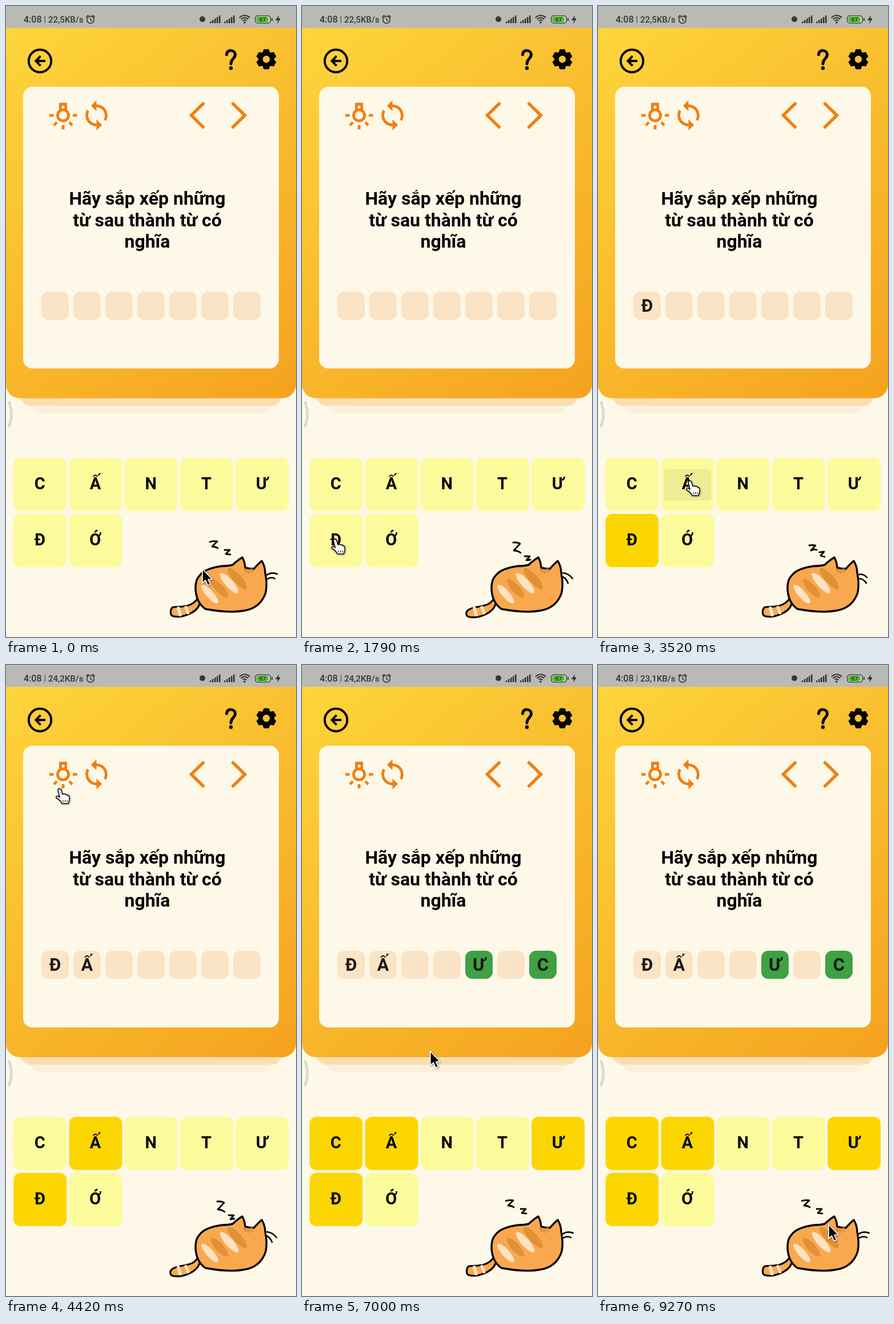
Write an HTML page with a canvas that moves like this. It is 508 px wide and 1102 px high and loops after 9.3 s.

```html
<!DOCTYPE html>
<html lang="vi">
<head>
<meta charset="utf-8">
<style>
html, body { margin: 0; width: 100%; height: 100%; overflow: hidden; background: #fdf8e8; }
canvas { display: block; width: 508px; height: 1102px; }
</style>
</head>
<body>
<canvas id="stage" width="508" height="1102"></canvas>
<script>
const ctx = document.getElementById('stage').getContext('2d');
const LOOP = 9300;
const CREAM = '#fdf8e8', ORANGE = '#f17f12', INK = '#353535';

// Times at which the game state switches
const pick = { 'Đ': 2020, 'Ấ': 3640, 'Ư': 4960, 'C': 5560 };
const rates = [[0, '22,5KB/s'], [4050, '24,2KB/s'], [8200, '23,1KB/s']];
const presses = [[1880, 2130, 0, 1], [3440, 3640, 1, 0], [7350, 7960, 2, 0]];
const tiles = ['CẤNTƯ', 'ĐỚ'];
const slots = ['Đ', 'Ấ', '', '', 'Ư', '', 'C'];

// Pointer: time, x, y
const route = [
  [0, 343, 982], [550, 343, 982], [1450, 57, 931], [2250, 57, 931], [3000, 160, 829],
  [3700, 160, 829], [4330, 93, 220], [4420, 93, 216], [4750, 96, 199], [6500, 96, 199],
  [7250, 268, 838], [7500, 268, 838], [7820, 294, 871], [8500, 360, 945], [9270, 403, 976]
];

function rect(x, y, w, h, r, fill) {
  ctx.fillStyle = fill;
  ctx.beginPath();
  ctx.roundRect(x, y, w, h, r);
  ctx.fill();
}

function line(points, color, width, cap = 'butt', join = 'miter') {
  ctx.strokeStyle = color;
  ctx.lineWidth = width;
  ctx.lineCap = cap;
  ctx.lineJoin = join;
  ctx.beginPath();
  for (let i = 0; i < points.length; i += 2) ctx.lineTo(points[i], points[i + 1]);
  ctx.stroke();
}

function arc(x, y, r, color, width, from = 0, to = Math.PI * 2) {
  ctx.strokeStyle = color;
  ctx.lineWidth = width;
  ctx.beginPath();
  ctx.arc(x, y, r, from, to);
  ctx.stroke();
}

function dot(x, y, r, color) {
  ctx.fillStyle = color;
  ctx.beginPath();
  ctx.arc(x, y, r, 0, Math.PI * 2);
  ctx.fill();
}

function shape(d, fill, stroke, width) {
  const path = new Path2D(d);
  ctx.lineJoin = ctx.lineCap = 'round';
  if (fill) { ctx.fillStyle = fill; ctx.fill(path); }
  if (stroke) { ctx.strokeStyle = stroke; ctx.lineWidth = width; ctx.stroke(path); }
}

function text(str, x, y, size, color = '#050505', weight = 700, align = 'center') {
  ctx.font = `${weight} ${size}px Roboto, sans-serif`;
  ctx.fillStyle = color;
  ctx.textAlign = align;
  ctx.fillText(str, x, y);
}

function drawStatus(t) {
  rect(0, 0, 508, 38, 0, '#b9b9b6');
  const rate = rates.filter(r => r[0] <= t).pop()[1];
  text('4:08', 31, 29, 16, INK, 500, 'left');
  text('|', 66.5, 28, 14, INK, 400, 'left');
  text(rate, 74, 29, 15, INK, 500, 'left');

  arc(148, 24, 6.2, INK, 1.6);
  line([148, 20.5, 148, 24.5, 151, 26], INK, 1.4);
  line([140.5, 19.5, 144.5, 16], INK, 1.7);
  line([151.5, 16, 155.5, 19.5], INK, 1.7);

  dot(344, 23, 5, INK);
  for (const x of [357, 382])
    for (let i = 0; i < 5; i++) rect(x + i * 4, 27 - i * 2.6, 2.6, 3 + i * 2.6, 0.5, INK);

  for (const r of [12.5, 8.5, 4.5]) arc(418, 29, r, INK, 2.2, -Math.PI * 0.76, -Math.PI * 0.24);
  dot(418, 29, 1.8, INK);

  rect(436, 16.5, 28, 14, 5, INK);
  rect(437.3, 17.8, 25.4, 11.4, 4, '#c9cbc5');
  rect(438.5, 19, 21, 9, 3, '#43c51b');
  rect(465, 21, 2, 5, 1, INK);
  text('87', 449.5, 27.5, 10.5, INK, 500);
  shape('M478 16 L472 25 L476 25 L475 31 L481 21.5 L477 21.5 Z', INK);
}

function drawPanel() {
  rect(44, 660, 420, 51, 16, '#fcf0dc');
  rect(26, 650, 456, 48, 16, '#fbddb0');
  const glow = ctx.createLinearGradient(0, 38, 508, 685);
  glow.addColorStop(0, '#fdd53b');
  glow.addColorStop(1, '#f5a21f');
  rect(0, 38, 508, 647, [0, 0, 24, 24], glow);
  rect(30, 141, 448, 492, 16, CREAM);
}

function drawGear(x, y) {
  ctx.save();
  ctx.translate(x, y);
  ctx.fillStyle = '#050505';
  ctx.beginPath();
  ctx.arc(0, 0, 13.3, 0, Math.PI * 2);
  ctx.arc(0, 0, 6.2, 0, Math.PI * 2, true);
  ctx.fill();
  for (let i = 0; i < 6; i++) {
    shape('M-6.5 -10 L-4 -17 L4 -17 L6.5 -10 Z', '#050505', '#050505', 1.2);
    ctx.rotate(Math.PI / 3);
  }
  ctx.restore();
}

function drawIcons() {
  arc(59.5, 96, 19.7, '#050505', 4);
  line([69, 96, 53, 96], '#050505', 4);
  line([60.5, 87.5, 52.5, 96, 60.5, 104.5], '#050505', 4);
  shape('M386.5 85 C386.5 75 401.5 76 401.5 85 C401.5 92 394 92 394 101', null, '#050505', 5);
  dot(394, 108.5, 3.2, '#050505');
  drawGear(456, 93);

  arc(100, 191, 9.6, ORANGE, 4.8);
  line([95.4, 184, 95.4, 171.5, 104.6, 171.5, 104.6, 184], ORANGE, 4.8);
  const rays = [[76, 191, 83.5, 191], [117, 191, 124.5, 191], [100, 208, 100, 215.5],
    [89, 203, 84, 208.5], [111, 203, 116, 208.5]];
  for (const ray of rays) line(ray, ORANGE, 4.8);

  ctx.save();
  ctx.translate(158.5, 191);
  ctx.scale(2.42, 2.38);
  const half = 'M0 -8V-11L-4 -7L0 -3V-6C3.31 -6 6 -3.31 6 0C6 1.01 5.75 1.97 5.3 2.8' +
    'L6.76 4.26C7.54 3.03 8 1.57 8 0C8 -4.42 4.42 -8 0 -8Z';
  shape(half, ORANGE);
  ctx.rotate(Math.PI);
  shape(half, ORANGE);
  ctx.restore();

  line([347, 169, 324.5, 191, 347, 213], ORANGE, 5.4);
  line([396, 169, 418.5, 191, 396, 213], ORANGE, 5.4);
}

function drawBoard(t) {
  ['Hãy sắp xếp những', 'từ sau thành từ có', 'nghĩa']
    .forEach((row, i) => text(row, 247.5, 347 + i * 37.6, 32));

  slots.forEach((letter, i) => {
    const shown = letter && t >= pick[letter];
    const x = 62 + i * 56;
    rect(x, 499, 48, 49, 12, shown && i > 1 ? '#40a044' : '#fbe3c5');
    if (shown) text(letter, x + 24, 534, 31, i > 1 ? '#101a10' : '#1d1b18');
  });

  tiles.forEach((row, j) => [...row].forEach((letter, i) => {
    const x = 13.3 + i * 97.2, y = 789 + j * 98;
    rect(x, y, 93, 93, 12, t >= pick[letter] ? '#fcd603' : '#fcfb9b');
    for (const [from, to, col, line] of presses)
      if (col === i && line === j && t >= from && t < to)
        rect(x + 5, y + 20, 83, 55, 5, 'rgba(190,190,130,.24)');
    text(letter, x + 46, y + 55, 29);
  }));

  shape('M5.5 692 Q13.5 713 5.5 734', null, '#dadace', 4.5);
}

const poses = [
  {
    z: ['M357 936 Q363 934 370 935 L361 944 Q367 944 371 947', 'M383 950 L392 950 L385 957 L393 958'],
    whiskers: 'M456 994 Q465 988 475 992 M457 1001 Q465 996 471 1000',
    tail: 'M336 1034 C325 1052 304 1048 292 1050 C288 1053 287 1062 291 1065 C303 1070 333 1062 339 1045'
  },
  {
    z: ['M370 937 Q376 936 382 939 L371 951 Q378 951 383 955', 'M390 961 L399 961 L393 968 L400 967'],
    whiskers: 'M457 990 Q467 991 474 1000 M457 997 Q463 1000 466 1008',
    tail: 'M336 1034 C329 1052 304 1046 291 1055 C286 1059 287 1066 293 1067 C309 1070 334 1061 339 1045'
  },
  {
    z: ['M370 942 Q376 941 381 942 L373 951 Q379 948 383 950', 'M388 954 L396 953 L390 960 L397 962'],
    whiskers: 'M456 993 Q465 991 471 998 M457 1000 Q465 1000 470 1008',
    tail: 'M336 1034 C325 1052 304 1048 292 1050 C288 1053 287 1062 291 1065 C303 1070 333 1062 339 1045'
  }
];

// Rounded stripe running down to the right
function stripe(x, y, length, width, color) {
  ctx.save();
  ctx.translate(x, y);
  ctx.rotate(0.84);
  ctx.fillStyle = color;
  ctx.beginPath();
  ctx.ellipse(0, 0, length / 2, width / 2, 0, 0, Math.PI * 2);
  ctx.fill();
  ctx.restore();
}

function drawCat(t) {
  const cycle = 328.5;
  const pose = poses[t < 550 ? 0 : Math.floor((t % cycle) / cycle * 3)];
  const fur = '#faa84f', dark = '#df9136', pale = '#fde2c3';

  shape(pose.tail, fur, '#050505', 3.2);
  line([302, 1052, 305, 1063], pale, 6, 'round');
  line([315, 1050, 319, 1060], pale, 5, 'round');
  shape('M337 1039 C330 1024 330 1004 339 995 C347 984 362 980 380 978 Q390 978 397 976' +
    'Q408 966 414 963 Q418 970 419 981 Q426 983 434 983 Q443 973 448 969' +
    'Q454 979 454 990 Q458 1008 455 1024 C449 1043 436 1053 417 1056' +
    'C395 1060 365 1056 349 1053 Q341 1047 337 1039 Z', fur, '#050505', 3.4);
  stripe(357, 1027, 42, 13, pale);
  stripe(374, 1017, 42, 14, dark);
  stripe(391, 1008, 46, 14, pale);
  stripe(405, 1000, 48, 15, dark);
  shape('M418 984 L420 988 M424 985 L425 990 M430 984 L431 988', null, dark, 4);
  shape(pose.whiskers, null, '#050505', 2.6);
  for (const z of pose.z) shape(z, null, '#050505', 2.8);
}

function pointerAt(t) {
  const i = Math.max(1, route.findIndex(p => p[0] >= t));
  const a = route[i - 1], b = t > 9270 ? a : route[i];
  if (t > 9270) return route[route.length - 1].slice(1);
  const k = (t - a[0]) / (b[0] - a[0]);
  const e = k * k * (3 - 2 * k);
  return [a[1] + (b[1] - a[1]) * e, a[2] + (b[2] - a[2]) * e];
}

function overButton(x, y) {
  const inTiles = (y > 789 && y < 868 && x > 13 && x < 495) || (y > 887 && y < 980 && x > 13 && x < 203);
  const inTools = y > 160 && y < 222 && x > 70 && x < 182;
  return inTiles || inTools;
}

function drawPointer(t) {
  const [x, y] = pointerAt(t);
  ctx.save();
  ctx.translate(x, y);
  ctx.shadowColor = 'rgba(0,0,0,.35)';
  ctx.shadowBlur = 3;
  ctx.shadowOffsetX = ctx.shadowOffsetY = 1;
  if (overButton(x, y)) {
    shape('M-2 3 C-2 -1 3 -1 4 3 L6 10 Q9 8 11 10 Q14 9 15 12 Q18 11 18 15' +
      'L18 20 L16 26 L5 26 Q2 20 -5 16 C-6 12 -2 12 1 15 Z', '#fff', '#111', 1.5);
    ctx.shadowColor = 'transparent';
    shape('M7 20 L7 23 M10.5 20 L10.5 23 M14 20 L14 23', null, '#111', 1.1);
  } else {
    shape('M1 1 L1 26 L6.5 21 L10.5 30 L15 28 L11 19.5 L18 19 Z', '#080808', '#fff', 1.7);
  }
  ctx.restore();
}

function frame(now) {
  const t = now % LOOP;
  rect(0, 0, 508, 1102, 0, CREAM);
  drawPanel();
  drawStatus(t);
  drawIcons();
  drawBoard(t);
  drawCat(t);
  drawPointer(t);
}

const start = performance.now();
function tick() {
  frame(performance.now() - start);
  requestAnimationFrame(tick);
}
tick();
</script>
</body>
</html>
```
